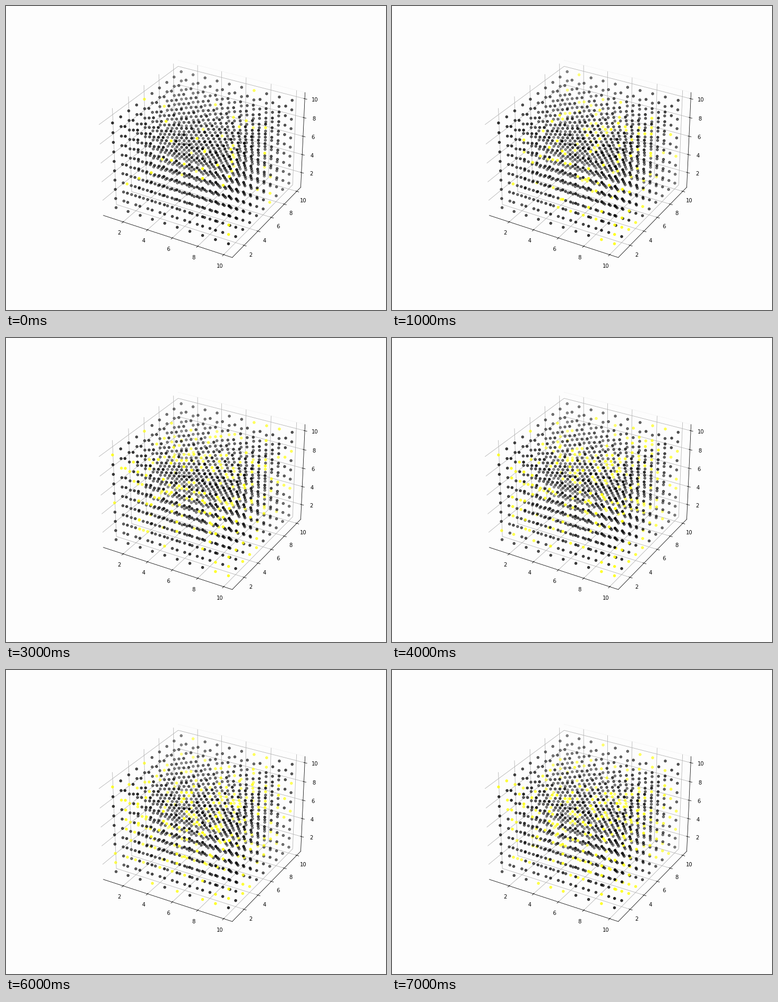
Write a matplotlib script that moves like this. It is 720 by 576 pixels and loops after 8 s.

```python
import numpy as np
import matplotlib.pyplot as plt
from matplotlib.animation import FuncAnimation

N = 10
STEPS, STEP_MS = 8, 1000
PAPER = "#fdfdfd"
DEAD, ALIVE = (0, 0, 0, 1), (1, 1, 0, 1)

# Places where live cells gather as the colony grows.
HOT_SPOTS = [(1, 1, 8.5), (9, 1, 1), (5.5, 5.5, 5.5), (9, 10, 10)]
HOT_RADIUS = 2.5
MEMORY = 0.7

grid = np.indices((N, N, N)).reshape(3, -1).T + 1


def heat():
    """Sum of soft bumps around the hot spots, one value per cell."""
    total = np.zeros(len(grid))
    for spot in HOT_SPOTS:
        distance = np.linalg.norm(grid - spot, axis=1)
        total += np.exp(-0.5 * (distance / HOT_RADIUS) ** 2)
    return total


def population(step):
    """Live cells at a step: quick growth that levels off."""
    return round(45 + 185 * (1 - np.exp(-step / 2.2)))


def grow():
    """Let the cells with the highest energy live at each step."""
    rng = np.random.default_rng(7)
    bias = heat()
    energy = rng.normal(size=len(grid))
    states = []
    for step in range(STEPS):
        score = energy + 0.9 * bias * min(step / 2, 1)
        state = np.zeros(len(grid), bool)
        state[np.argsort(score)[-population(step):]] = True
        states.append(state)
        fresh = rng.normal(size=len(grid))
        energy = MEMORY * energy + np.sqrt(1 - MEMORY ** 2) * fresh
    return states


def colours(state):
    return np.where(state[:, None], ALIVE, DEAD).astype(float)


states = grow()

fig = plt.figure(figsize=(10, 8), dpi=72, facecolor=PAPER)
fig.subplots_adjust(bottom=0.125)
ax = fig.add_subplot(projection="3d", facecolor=PAPER)

# Five per cent of padding, then a thin margin around the box.
pad = 0.05 * (N - 1)
pad += (N - 1 + 2 * pad) / 48
low, high = 1 - pad, N + pad

cells = ax.scatter(*grid.T, c=colours(states[0]))
ax.plot([low, high], [high, high], [high, high], ":", color="#e4e4e4", lw=0.8)

ticks = range(2, N + 1, 2)
ax.set(xlim=(low, high), ylim=(low, high), zlim=(low, high),
       xticks=ticks, yticks=ticks, zticks=ticks)
for axis in (ax.xaxis, ax.yaxis, ax.zaxis):
    axis.set_pane_color(PAPER)


def update(step):
    cells.set_facecolor(colours(states[step]))
    return [cells]


anim = FuncAnimation(fig, update, frames=STEPS, interval=STEP_MS,
                     repeat=True, repeat_delay=0)
plt.show()
```
